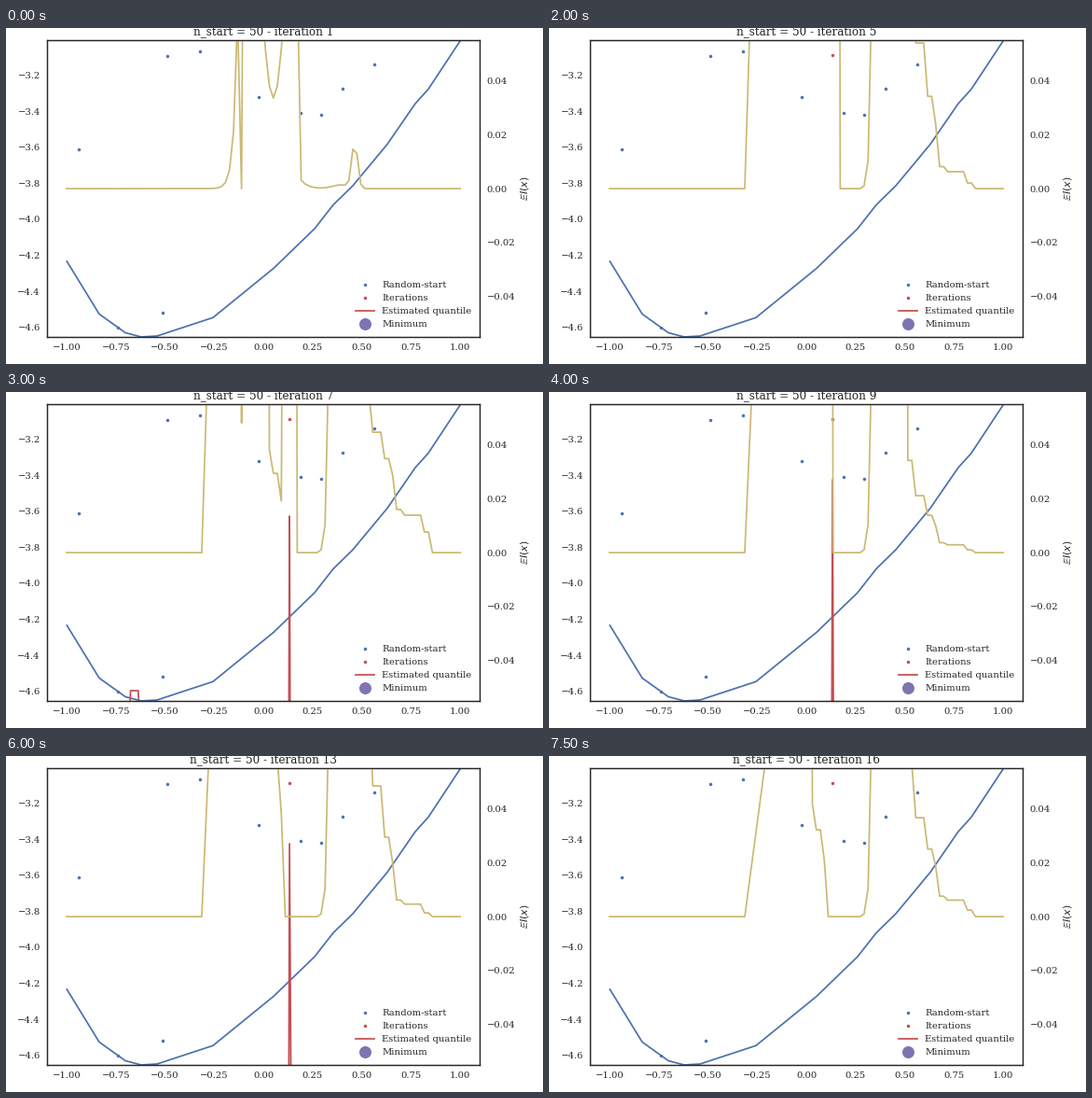
A matplotlib script for the animation above (8 s loop, 576 by 360 pixels).

```python
import numpy as np
import matplotlib.pyplot as plt
from matplotlib.animation import FuncAnimation

W, H, DPI = 576, 360, 72
LEFT, RIGHT, TOP, BOTTOM = 43.8, 508.4, 13, 331.2
BLUE, RED, PURPLE, GOLD = "#4C72B0", "#C44E52", "#8172B2", "#CCB974"
DARK = ".15"
STEPS = 16

plt.rcParams.update({
    "font.family": "DejaVu Serif", "font.size": 10,
    "axes.titlesize": 12, "axes.labelsize": 11,
    "axes.linewidth": 1.25, "axes.edgecolor": DARK, "axes.labelcolor": DARK,
    "text.color": DARK, "xtick.color": DARK, "ytick.color": DARK,
    "xtick.major.size": 0, "ytick.major.size": 0,
    "xtick.major.pad": 7, "ytick.major.pad": 7,
    "lines.linewidth": 1.75, "lines.markersize": 7,
    "lines.markeredgewidth": 0, "mathtext.fontset": "dejavusans",
})

Y_SCALE = 270.3 / 1.4                    # pixels per unit, left axis
EI_SCALE = (BOTTOM - TOP) / 0.11         # pixels per unit, right axis


def to_x(px):
    return -1.1 + 2.2 * (np.asarray(px) - LEFT) / (RIGHT - LEFT)


def to_y(py):
    return -3.2 - (np.asarray(py) - 50.5) / Y_SCALE


def to_data(points):
    px, py = np.transpose(points)
    return to_x(px), to_y(py)


# Stage pixels
OBJECTIVE = [
    (65.3, 250), (100, 306.5), (128, 326.5), (145, 331), (162, 330),
    (222, 310.3), (287, 257.5), (331, 215), (351, 189.5), (372, 169),
    (409, 124.5), (439, 81), (453, 65.5), (487.7, 13),
]
SAMPLES = [
    (78.1, 130), (120.1, 321), (168.1, 305), (173.1, 30), (208.1, 25),
    (271.1, 74), (316.1, 91), (338.1, 93), (361.1, 65), (395.1, 39),
]
PICKED = [(304.1, 29)]

# Expected improvement: heights in pixels over 100 evaluation points
KNOTS = np.arange(100)
GRID = np.linspace(0, 99, 991)
WALL = 2500
TREADS = (75, 77, 80, 82, 83, 85, 90, 92)
DECAY = (-.16, 0, .14, .25, .58, .66, 1)


def first_improvement():
    k = KNOTS.astype(float)
    rise = 62 * 3.0 ** (k - 42)
    bowl = 97 + 13 * (k - 52) ** 2
    fall = 9 * np.where(k < 59, 25.0, 0.55) ** np.abs(k - 59)
    h = np.minimum(np.minimum(rise, fall), bowl)
    h[44] = 0
    h += 50 * np.exp(-(k - 72.45) ** 2) + 4 * np.exp(-((k - 69) / 3) ** 2)
    return np.interp(GRID, k, h)


def later_improvement(rise, end, top, last, shoulder=0, notch=0):
    """Two walls with a flat valley, then a staircase from top to last."""
    pts = [(34, 0), (39, 5 * rise), (40, WALL)]
    if notch:
        pts += [(43, WALL), (44, notch), (45, WALL)]
    if shoulder:
        pts += [(50, WALL), (51, 1.3 * shoulder), (52, shoulder),
                (53, shoulder), (54, .65 * shoulder)]
    if not shoulder or end > 55:
        pts.append((end - 1, WALL))
    pts += [(end, 0), (63, 0), (64, 3), (65, 30), (66, 220),
            (67, WALL), (74, WALL)]
    for a, b, t in zip(TREADS, TREADS[1:], DECAY):
        h = top * (last / top) ** t
        pts += [(a, h), (b - 1, h)]
    pts.append((TREADS[-1], 0))
    return np.interp(GRID, *np.transpose(pts))


EI = {
    1: first_improvement(),
    5: later_improvement(136, 58, 156, 6),
    7: later_improvement(136, 58, 129, 22, shoulder=85, notch=139),
    9: later_improvement(97, 56.2, 61, 3),
    11: later_improvement(75, 55, 70, 7, shoulder=138),
    13: later_improvement(97, 55, 140, 4, shoulder=170),
    16: later_improvement(32, 55, 106, 7, shoulder=93),
}


def improvement(step):
    """Blend on a log scale between the nearest known iterations."""
    a = max(k for k in EI if k <= step)
    b = min(k for k in EI if k >= step)
    t = (step - a) / max(b - a, 1)
    return np.expm1((1 - t) * np.log1p(EI[a]) + t * np.log1p(EI[b]))


def quantile(step):
    """Visible parts of the estimated quantile."""
    if not 7 <= step <= 14:
        return [], []
    below = BOTTOM + 30
    start = step == 7
    spread = 0.7 + 0.15 * (step - 7)
    pts = [(303.3, below), (304.1, 133 if start else 94),
           (304.1 + spread, below)]
    if start:
        pts = [(132, below), (133.6, 320), (141.8, 320), (144, below)] + pts
    return to_data(pts)


fig = plt.figure(figsize=(W / DPI, H / DPI), dpi=DPI, facecolor="white")
ax = fig.add_axes([LEFT / W, 1 - BOTTOM / H,
                   (RIGHT - LEFT) / W, (BOTTOM - TOP) / H])
twin = ax.twinx()

ax.plot(*to_data(OBJECTIVE), color=BLUE)
ax.plot(*to_data(SAMPLES), ".", color=BLUE, label="Random-start")
picked, = ax.plot([], [], ".", color=RED, label="Iterations")
quant, = ax.plot([], [], color=RED, label="Estimated quantile")
ax.plot([], [], "o", color=PURPLE, ms=13, label="Minimum")
ei_line, = twin.plot(np.linspace(-1, 1, len(GRID)), 0 * GRID, color=GOLD)

ax.set_xlim(-1.1, 1.1)
ax.set_ylim(to_y(BOTTOM), to_y(TOP))
twin.set_ylim(-0.055, 0.055)
ax.set_xticks(np.linspace(-1, 1, 9))
ax.set_yticks(np.linspace(-4.6, -3.2, 8))
twin.set_yticks(np.linspace(-0.04, 0.04, 5))
twin.set_ylabel(r"$\mathbb{E}I(x)$", labelpad=4)
ax.legend(loc="lower right", frameon=False, numpoints=1)
title = ax.set_title("", y=1, pad=6)


def update(i):
    step = i + 1
    title.set_text(f"n_start = 50 - iteration {step}")
    picked.set_data(*(to_data(PICKED) if step >= 3 else ([], [])))
    quant.set_data(*quantile(step))
    ei_line.set_ydata(improvement(step) / EI_SCALE)
    return title, picked, quant, ei_line


anim = FuncAnimation(fig, update, frames=STEPS, interval=500,
                     repeat=True, repeat_delay=0, blit=False)
plt.show()
```
